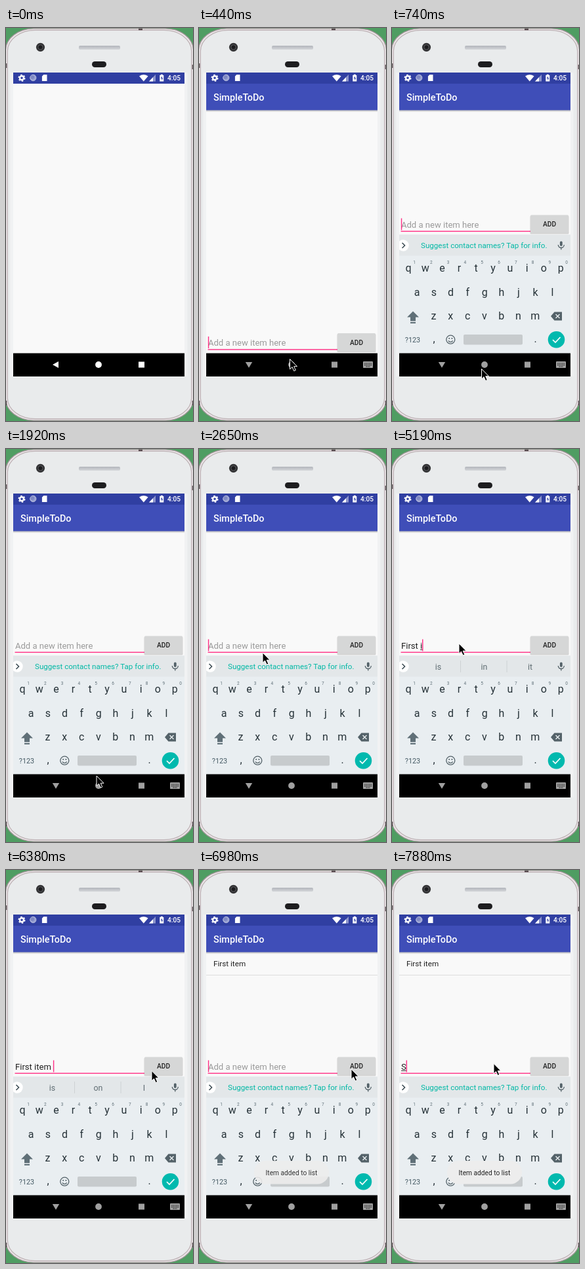
Animation of 285 by 600 pixels, one loop 8000 ms. Source, as an HTML page:

```html
<!DOCTYPE html>
<html lang="en">
<head>
<meta charset="utf-8">
<style>
html, body { margin: 0; width: 100%; height: 100%; overflow: hidden; background: #4f9d62; }
svg { display: block; width: 285px; height: 600px; }
text { font-family: Roboto, sans-serif; white-space: pre; }
.mid { text-anchor: middle; }
.bold { font-weight: 500; }
.keys { font-size: 16px; fill: #263238; }
</style>
</head>
<body>
<svg viewBox="0 0 285 600">
  <defs>
    <linearGradient id="speaker" x2="0" y2="1">
      <stop stop-color="#b2b5bb"/><stop offset="1" stop-color="#d5d7da"/>
    </linearGradient>
    <linearGradient id="shade" x2="0" y2="1">
      <stop stop-color="#000" stop-opacity=".25"/><stop offset="1" stop-color="#000" stop-opacity="0"/>
    </linearGradient>
    <clipPath id="screen"><rect x="11" y="68" width="261" height="464"/></clipPath>
  </defs>

  <!-- phone -->
  <rect width="285" height="600" fill="#4f9d62"/>
  <rect x="-.5" y=".8" width="286" height="598.4" rx="43" ry="33" fill="#ebe6e8" stroke="#a3959a" stroke-width="1.2"/>
  <rect x="2.3" y="3.3" width="280.4" height="593.4" rx="42" ry="32" fill="#e9ebec" stroke="#bdb0b4" stroke-width="1.2"/>
  <rect x="6.5" y="68" width="4.5" height="464" fill="#f1f2f3"/>
  <rect x="272" y="68" width="4.5" height="464" fill="#f1f2f3"/>
  <path d="M0 54v7M285 56v7M0 569v7M285 569v7M202 2h6" stroke="#55494d" stroke-width="2.5"/>
  <circle cx="52.5" cy="29.3" r="6.6" fill="#333335"/>
  <circle cx="52.5" cy="29.3" r="3.6" fill="#1c1c1e" stroke="#58585c"/>
  <rect x="111" y="27" width="63" height="6" rx="2" fill="url(#speaker)"/>
  <rect x="131" y="51" width="22" height="9" rx="4.5" fill="#1d1d1f"/>

  <g clip-path="url(#screen)">
    <rect x="11" y="68" width="261" height="464" fill="#f9f9f9"/>

    <!-- app -->
    <g id="app">
      <rect x="11" y="85" width="261" height="40.5" fill="#3f4eb8"/>
      <rect x="11" y="125.5" width="261" height="3" fill="url(#shade)"/>
      <text class="bold" x="22" y="111" font-size="14.4" fill="#fff">SimpleToDo</text>
      <g id="item">
        <text x="22" y="147" font-size="11.7" fill="#212121">First item</text>
        <rect x="11" y="160" width="261" height="1" fill="#dedede"/>
      </g>
      <g id="form">
        <rect x="13.5" y="309.7" width="197.5" height="1.4" fill="#ff2d84"/>
        <text id="hint" x="14" y="304.5" font-size="13.05" fill="#9a9a9a">Add a new item here</text>
        <text id="field" x="14" y="304.5" font-size="13.05" fill="#212121"></text>
        <rect id="line" y="306" height="1" fill="#333"/>
        <rect id="caret" y="290.5" width="1.4" height="18" fill="#ff2d84"/>
        <rect x="210.5" y="286.5" width="59" height="28" rx="1.5" fill="#000" opacity=".16"/>
        <rect id="button" x="211" y="285.5" width="58" height="27.5" rx="1.5" fill="#d6d7d7"/>
        <text class="mid bold" x="240" y="303" font-size="10.2" fill="#212121">ADD</text>
      </g>
    </g>

    <!-- keyboard -->
    <g id="board">
      <rect x="11" y="315.5" width="261" height="182" fill="#e9eef1"/>
      <rect x="11" y="315.5" width="261" height="32" fill="#e3e7e9"/>
      <circle cx="17" cy="332" r="8.7" fill="#fff"/>
      <path d="M15.5 328l4 4-4 4" fill="none" stroke="#37474f" stroke-width="1.5"/>
      <text id="tip" class="mid" x="140.3" y="336.3" font-size="11.6" fill="#00b8a5">Suggest contact names? Tap for info.</text>
      <g id="words" class="mid" font-size="12.4" fill="#5f6c72">
        <path d="M104.5 323v18M175 323v18" stroke="#cdd2d4"/>
        <text x="70.5" y="337"></text><text x="140.5" y="337"></text><text x="210.5" y="337"></text>
      </g>
      <g fill="none" stroke="#546269" stroke-width="1.3">
        <rect x="255.9" y="325.5" width="3.8" height="7.5" rx="1.9" fill="#546269" stroke="none"/>
        <path d="M253.3 331a4.5 4.5 0 0 0 9 0M257.8 335.5v3"/>
        <circle cx="89.3" cy="475.7" r="6.5"/>
        <path d="M86 477.3a3.5 3.2 0 0 0 6.6 0"/>
        <path d="M86.3 473.8h1.8M90.5 473.8h1.8" stroke-width="1.8"/>
      </g>
      <g id="letters" class="mid keys"></g>
      <path d="M32 432.5l9 9h-5v6h-8v-6h-5zM28 449h8v2h-8z" fill="#607078"/>
      <path d="M242 440l5.5-6.5h11.5v13h-11.5z" fill="#546269"/>
      <path d="M249.5 437l6 6m0-6l-6 6" stroke="#e9eef1" stroke-width="1.4"/>
      <text class="mid" x="31.5" y="480" font-size="10.8" fill="#455a64">?123</text>
      <rect x="109" y="468" width="90" height="15.5" rx="2" fill="#c7cbcd"/>
      <circle cx="250.5" cy="475.7" r="12.8" fill="#00b9ae"/>
      <path d="M245 476l4 4 7.5-8" fill="none" stroke="#fff" stroke-width="1.7"/>
    </g>

    <!-- status bar -->
    <rect x="11" y="68" width="261" height="17" fill="#303fa2"/>
    <g fill="#fff">
      <circle cx="24" cy="76.3" r="3" fill="none" stroke="#fff" stroke-width="2.4"/>
      <circle cx="24" cy="76.3" r="4.7" fill="none" stroke="#fff" stroke-width="1.6" stroke-dasharray="2.46"/>
      <circle cx="41.3" cy="76" r="4.6" fill="#9aa3d2" stroke="#c3c8e4" stroke-width=".9"/>
      <circle cx="40.3" cy="75" r="2.9" fill="#7f89c4"/>
      <path d="M57.3 71.3h5.2v9.7h-7.6v-7.2z"/>
      <path d="M203 73.6q6.8-4.8 13.6 0l-6.8 8z"/>
      <path d="M228 71v10.5h-10z" opacity=".45"/>
      <path d="M224 75.2v6.3h-6z"/>
      <path d="M234.3 72h1.5v-1.2h3v1.2h1.5v9.5h-6z"/>
      <path d="M238 73.5l-2.2 3.5h1.5v3l2-3.5h-1.3z" fill="#303fa2"/>
      <text class="bold" x="246" y="80" font-size="10.2">4:05</text>
    </g>

    <!-- navigation bar -->
    <rect x="11" y="496.5" width="261" height="36" fill="#000"/>
    <g id="nav">
      <path id="back" d="M71 514l9-5v10z"/>
      <path id="down" d="M70.8 510h10.4l-5.2 8.7z"/>
      <circle cx="141" cy="514" r="4.9"/>
      <rect x="202" y="509.5" width="9" height="9"/>
      <g id="switch">
        <rect x="250" y="509" width="15" height="10" rx="1"/>
        <path d="M252 512h11.5M252 514.5h11.5M254.5 517h6" stroke="#000" stroke-width="1.2" stroke-dasharray="1.5 .9"/>
      </g>
    </g>

    <g id="toast">
      <rect x="84" y="444" width="114" height="35.5" rx="17.5" fill="#ededed"/>
      <text class="mid" x="141" y="466" font-size="10.2" fill="#222">Item added to list</text>
    </g>
  </g>
  <path id="pointer" d="M0 0v15.4l3.5-3.3 2.7 6 2.6-1.2-2.6-5.7h4.8z" fill="#000" stroke="#fff" stroke-linejoin="round"/>
</svg>
<script>
const $ = id => document.getElementById(id);
const show = (id, on) => $(id).style.display = on ? "" : "none";
const put = (x, y, s, more = "") => $("letters").insertAdjacentHTML("beforeend", `<text x="${x}" y="${y}" ${more}>${s}</text>`);

[["qwertyuiop", 25, 371.5], ["asdfghjkl", 38, 408.5], ["zxcvbnm", 63.5, 445]].forEach(([row, x, y], r) =>
  [...row].forEach((c, i) => {
    put(x + 25.8 * i, y, c);
    if (!r) put(x + 9 + 25.8 * i, 360, (i + 1) % 10, 'font-size="6.5" fill="#607078"');
  }));
put(64, 480, ",");
put(218.5, 480, ".");

// each row holds from its time until the next
const TYPED = [
  [0, "", ""],
  [3700, "Fir", ""],
  [3990, "First", "First Firstly First-hand"],
  [4290, "First ", "of and the"],
  [4590, "First o", "of on or"],
  [5040, "First ", "of and the"],
  [5190, "First i", "is in it"],
  [5640, "First ite", "item items iterate"],
  [5790, "First item", "item items itemized"],
  [6080, "First item ", "is on I"],
  [6530, "", ""],
  [7880, "S", ""]
];
const CARET = [[0, 1], [1030, 0], [1330, 1], [1920, 0], [2370, 1], [2950, 0], [3400, 1], [7130, 0], [7880, 1]];
const POINTER = [
  [0, -50, 0], [290, 140, 500], [440, 138.5, 505.5], [590, 137, 514], [740, 136.5, 520.5], [880, 137, 508], [1030, 138, 499],
  [2370, 132, 450], [2500, 112, 360], [2650, 97, 311], [2800, 100, 300], [2950, 102, 297],
  [6080, 120, 299], [6230, 170, 304], [6380, 222, 306.5], [6530, 232, 304],
  [7130, 220, 302], [7280, 180, 298], [7430, 155, 295.5]
];
const FADE = [[0, 0], [6680, .3], [6830, .7], [6980, .9], [7130, 1]];
const at = (list, t) => list.findLast(row => row[0] <= t);

function draw(t) {
  const [, text, sug] = at(TYPED, t), [, px, py] = at(POINTER, t);
  const up = t >= 590, ime = t >= 440;
  show("app", t >= 150);
  show("item", t >= 6530);
  $("form").setAttribute("transform", `translate(0 ${up ? 0 : 180.5})`);
  $("button").setAttribute("fill", t >= 6530 && t < 6680 ? "#c3c4c4" : "#d6d7d7");

  show("hint", !text);
  const measure = s => { $("field").textContent = s; return s ? $("field").getComputedTextLength() : 0; };
  const start = measure(text.slice(0, text.lastIndexOf(" ") + 1)), end = measure(text);
  $("line").setAttribute("x", 14 + start);
  $("line").setAttribute("width", Math.max(0, end - start));
  $("caret").setAttribute("x", 13.8 + end);
  show("caret", at(CARET, t)[1]);

  show("board", up);
  $("board").setAttribute("opacity", t < 740 ? .7 : 1);
  $("board").setAttribute("transform", `translate(0 ${t < 740 ? 18 : 0})`);
  show("tip", !sug);
  show("words", sug);
  const words = sug.split(" ");
  document.querySelectorAll("#words text").forEach((el, i) => el.textContent = words[i] || "");

  show("back", !ime);
  show("down", ime);
  show("switch", ime);
  $("nav").setAttribute("fill", ime ? "#a0a0a0" : "#fff");
  $("toast").setAttribute("opacity", at(FADE, t)[1]);
  $("pointer").setAttribute("transform", `translate(${px} ${py})`);
}

const begin = performance.now();
function tick() {
  draw((performance.now() - begin) % 8000);
  requestAnimationFrame(tick);
}
tick();
</script>
</body>
</html>
```
